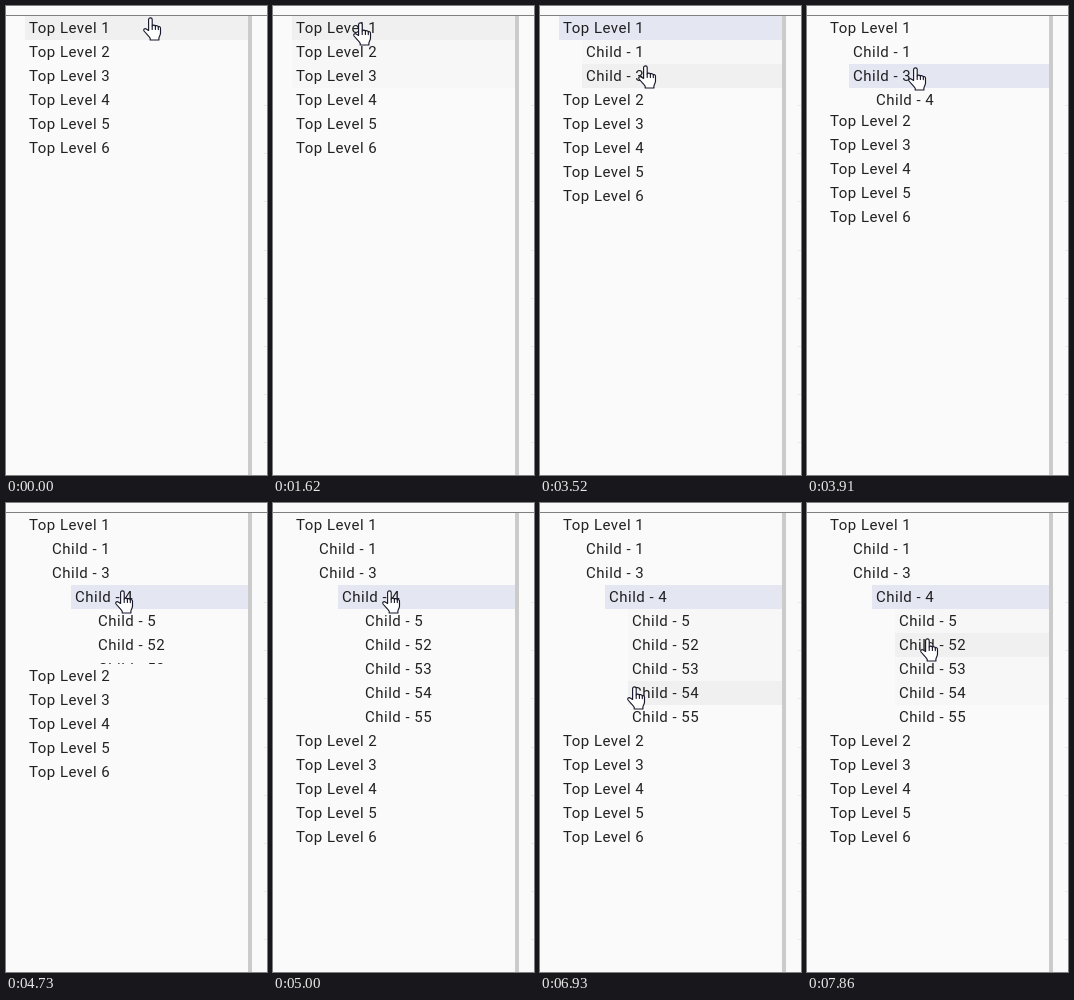
Write an HTML page that moves like this. It is 261x469 px and loops after 8 s.

```html
<!DOCTYPE html>
<html lang="en">
<head>
<meta charset="utf-8">
<title>Tree view</title>
<style>
  html, body { margin: 0; width: 100%; height: 100%; overflow: hidden; background: #fafafa; }
  #stage { position: relative; width: 261px; height: 469px; overflow: hidden; }
  #stage > * { position: absolute; }
  #edge { left: 0; top: 9px; width: 261px; height: 1px; background: #808080; }
  #bar { left: 242px; top: 10px; width: 4px; height: 459px; background: #cbcbcb; }
  #marks {
    left: 258px; top: 99px; width: 3px; height: 370px;
    background: repeating-linear-gradient(#e8e8e8 0 1px, transparent 1px 48.2px);
  }
  #tree {
    left: 19px; top: 10px; width: 223px;
    font: 15px/24px Roboto, "Liberation Sans", sans-serif;
    letter-spacing: 0.5px; color: rgba(0, 0, 0, 0.87);
  }
  .label { height: 24px; padding-left: 4px; white-space: nowrap; }
  .label.seen { background: #f7f7f7; }
  .label.hover { background: #f0f0f0; }
  .label.selected { background: #e4e6f2; }
  .group { margin-left: 23px; overflow: hidden; }
  #hand { left: 0.3px; top: 0.5px; width: 19px; height: 25px; overflow: visible; }
</style>
</head>
<body>
<div id="stage">
  <div id="tree"></div>
  <div id="bar"></div>
  <div id="marks"></div>
  <div id="edge"></div>
  <svg id="hand" viewBox="0 0 19 25" fill="#fff" stroke="#17172a" stroke-width="1.15" stroke-linejoin="round" stroke-linecap="round">
    <path d="M5.6 13.5V2.6a1.8 1.8 0 0 1 3.6 0V9c.4-1.3 3-1.3 3.2.3.6-1 2.7-.8 2.9.6.7-.6 2.2-.2 2.2 1.3V16c0 2.2-1.3 3.2-1.6 5v2H7.2v-1.7C6 19 3 16.6 1 14c-1-1.6.8-3 2.2-2.1z"/>
    <path fill="none" d="M9.2 9v3.4M12.4 9.3v3.1M15.3 9.9v2.7"/>
  </svg>
</div>
<script>
const LOOP = 8000, ROW = 24, OPEN_MS = 300;
const TICK = 133.5, PHASE = 37.5; // the picture refreshes once per tick
const $ = id => document.getElementById(id);

// Nested tree; "at" is the moment the row is clicked open.
const level = n => ({ text: 'Top Level ' + n });
const child = n => ({ text: 'Child - ' + n });
const leaves = [5, 52, 53, 54, 55].map(child);
const data = [
  { ...level(1), at: 2007, kids: [
    child(1),
    { ...child(3), at: 3730, kids: [
      { ...child(4), at: 4610, kids: leaves }
    ] }
  ] },
  ...[2, 3, 4, 5, 6].map(level)
];

// Pointer strokes: start, duration, goal. It rests in between.
const home = [137, 10];
const strokes = [
  [720, 360, 109, 66], [1150, 340, 80, 15],
  [2440, 400, 95, 56], [3250, 500, 101, 60], [4040, 280, 109, 86],
  [5430, 470, 70, 198], [6090, 260, 113, 122],
  [6500, 550, 72, 218], [7050, 390, 110, 124], [7450, 320, 113, 134]
];

const rows = [];

function add(name, parent, text = '') {
  const el = document.createElement('div');
  el.className = name;
  el.textContent = text;
  parent.append(el);
  return el;
}

function build(items, parent) {
  for (const item of items) {
    const row = { ...item, label: add('label', parent, item.text) };
    rows.push(row);
    if (item.kids) {
      row.group = add('group', parent);
      build(item.kids, row.group);
    }
  }
}

const clamp = v => Math.min(1, Math.max(0, v));

// cubic-bezier(0.4, 0, 0.2, 1)
function ease(x) {
  if (x <= 0 || x >= 1) return clamp(x);
  let lo = 0, hi = 1;
  for (let i = 0; i < 24; i++) {
    const u = (lo + hi) / 2, v = 1 - u;
    if (1.2 * u * v * v + 0.6 * u * u * v + u * u * u < x) lo = u; else hi = u;
  }
  return lo * lo * (3 - 2 * lo);
}

const snap = t => Math.max(0, Math.floor((t - PHASE) / TICK) * TICK + PHASE);

function pointer(t) {
  let [x, y] = home;
  for (const [start, span, goalX, goalY] of strokes) {
    const p = clamp((t - start) / span);
    x += (goalX - x) * p;
    y += (goalY - y) * p;
  }
  return [Math.round(x), Math.round(y)];
}

function openGroups(now) {
  let picked = null;
  for (const row of rows) {
    if (!row.group) continue;
    const p = ease((now - row.at) / OPEN_MS);
    if (now >= row.at) picked = row;
    row.group.style.display = p ? 'block' : 'none';
    row.group.style.height = p < 1 ? p * row.kids.length * ROW + 'px' : 'auto';
  }
  return picked;
}

function draw(now) {
  const picked = openGroups(now);
  const [x, y] = pointer(now);
  $('hand').style.transform = `translate(${x}px, ${y}px)`;

  const boxes = rows.map(row => row.label.getBoundingClientRect());
  const rowAt = t => {
    const [px, py] = pointer(t);
    return rows[boxes.findIndex(b =>
      px + 7 >= b.left && px + 7 < b.right && py + 1 >= b.top && py + 1 < b.bottom)];
  };

  // Rows passed since the last click keep a faint tint.
  const seen = new Set();
  for (let t = now; t >= (picked ? picked.at : 0); t -= TICK) seen.add(rowAt(t));

  const over = rowAt(now);
  for (const row of rows) {
    const list = row.label.classList;
    list.toggle('seen', seen.has(row));
    list.toggle('hover', row === over);
    list.toggle('selected', row === picked);
  }
}

build(data, $('tree'));
const start = performance.now();
let shown = -1;

function frame() {
  const now = snap(Math.max(0, performance.now() - start) % LOOP);
  if (now !== shown) draw(shown = now);
  requestAnimationFrame(frame);
}
frame();
</script>
</body>
</html>
```
